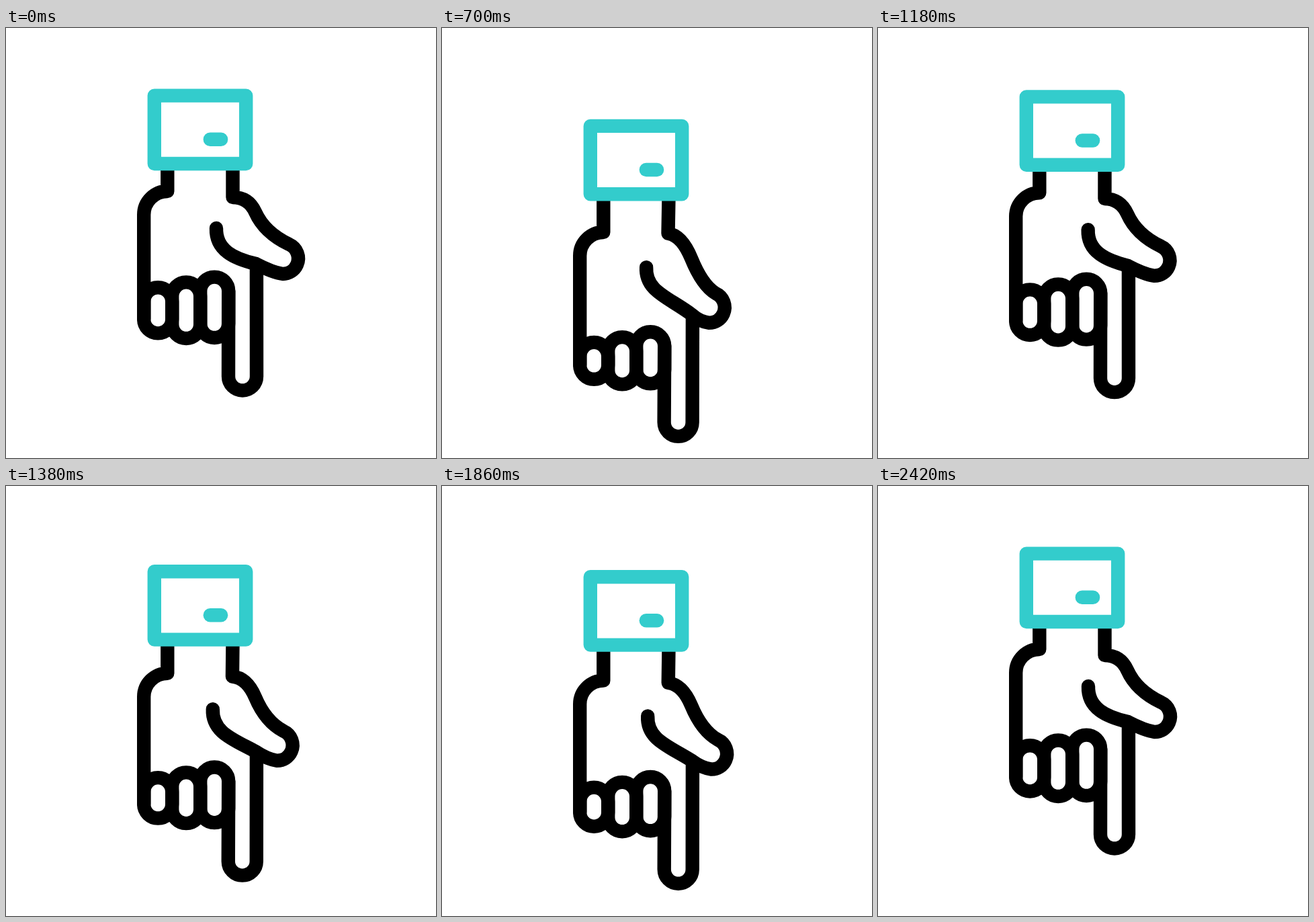
These frames come from a looping animation (640 px wide and 640 px high, 3.08 s). An HTML page with a canvas:

```html
<!DOCTYPE html>
<html lang="en">
<head>
<meta charset="utf-8">
<title>Pointing hand</title>
<style>
  html, body { margin: 0; width: 100%; height: 100%; overflow: hidden; background: #fff; }
  canvas { display: block; width: 640px; height: 640px; }
</style>
</head>
<body>
<canvas id="stage" width="640" height="640"></canvas>
<script>
const ctx = document.getElementById('stage').getContext('2d');
const LOOP = 3080, STEP = 20;
const START = 206, STROKE = 460, LAST_RISE = 844;
const SKIN = '#000', CUFF = '#33cccc';

const smooth = u => u * u * (3 - 2 * u);

// 0 = raised, 1 = pressed: down, up, down, then a slower rise
function pressAt(t) {
  const phase = (t - START) / STROKE;
  if (phase <= 0) return 0;
  if (phase < 3) {
    const u = smooth(phase % 1);
    return Math.floor(phase) % 2 ? 1 - u : u;
  }
  return 1 - smooth(Math.min(1, (t - START - 3 * STROKE) / LAST_RISE));
}

function drawPalm(p) {
  const drop = 62 * p;
  ctx.beginPath();
  ctx.moveTo(240.3, 205 + 46 * p);
  ctx.lineTo(240.3, 243 + drop);
  ctx.arcTo(205.2, 243 + drop, 205.2, 278 + drop, 35);
  ctx.lineTo(205.2, 433 + 69.5 * p);
  ctx.stroke();
}

function drawFingers(p) {
  const knuckle = 83 * p, tip = 69.5 * p, width = 42;

  // Folded fingers, each knuckle a little higher than the one before
  for (let i = 0; i < 3; i++) {
    const top = 386.2 - 7.8 * i + knuckle;
    const bottom = (i ? 463 - i : 454.4) + tip;
    ctx.beginPath();
    ctx.roundRect(205.2 + width * i, top, width, bottom - top, width / 2);
    ctx.stroke();
  }

  // Index finger
  ctx.beginPath();
  ctx.moveTo(331.2, 391.6 + knuckle);
  ctx.arc(352 - 0.4 * p, 518.5 + tip, 21, Math.PI, 0, true);
  ctx.lineTo(372.9, 352 + 77 * p);
  ctx.stroke();
}

function drawThumb(p) {
  // A raised position and its shift when pressed
  const at = (x, y, dx, dy) => [x + dx * p, y + dy * p];
  ctx.beginPath();
  ctx.moveTo(337.5, 205 + 46 * p);
  ctx.lineTo(...at(337.5, 252, -1, 54.5));
  ctx.quadraticCurveTo(...at(361, 252, -4, 58), ...at(371, 274, 0, 70));
  const [x, y] = at(412, 343, -14.5, 74);
  const angle = -1.15, radius = 23;
  ctx.quadraticCurveTo(...at(384.7, 304.6, 2.6, 79.4),
    x + radius * Math.cos(angle), y + radius * Math.sin(angle));
  ctx.arc(x, y, radius, angle, Math.PI / 2);
  ctx.quadraticCurveTo(...at(397, 364, -14, 74), ...at(372, 351, 0, 77));
  ctx.bezierCurveTo(...at(340, 343.5, -2, 58.5), ...at(312, 331, -10, 62), ...at(313, 298, -9, 59));
  ctx.stroke();
}

function drawCuff(p) {
  const y = 46 * p;
  ctx.strokeRect(220.8, 100.6 + y, 136.4, 101.4);
  ctx.beginPath();
  ctx.moveTo(303.8, 165.7 + y);
  ctx.lineTo(320.1, 165.7 + y);
  ctx.stroke();
}

function draw(time) {
  const p = pressAt(Math.floor((time % LOOP) / STEP) * STEP);
  ctx.fillStyle = '#fff';
  ctx.fillRect(0, 0, 640, 640);
  ctx.lineWidth = 20.4;
  ctx.lineCap = ctx.lineJoin = 'round';
  ctx.strokeStyle = SKIN;
  drawPalm(p);
  drawFingers(p);
  drawThumb(p);
  ctx.strokeStyle = CUFF;
  drawCuff(p);
}

const origin = performance.now();
function tick() {
  draw(performance.now() - origin);
  requestAnimationFrame(tick);
}
tick();
</script>
</body>
</html>
```
